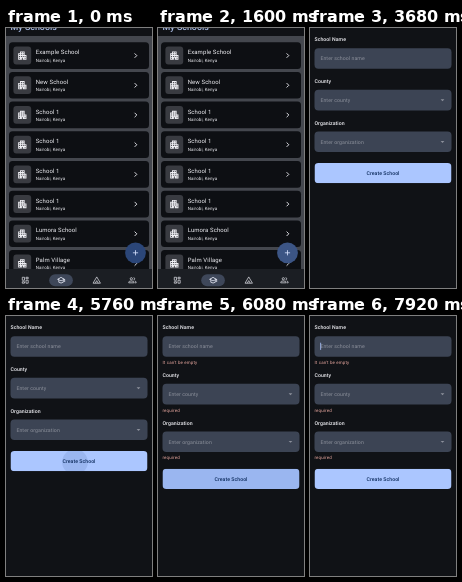
An HTML page that plays this animation: 146x260 px, repeating every 8 s.

```html
<!DOCTYPE html>
<html lang="en">
<head>
<meta charset="utf-8">
<title>School list and form</title>
<style>
  html, body { margin: 0; height: 100%; overflow: hidden; background: #101216; }
  svg { display: block; width: 100vw; height: 100vh; }
  text { font-family: Roboto, "Open Sans", sans-serif; text-rendering: geometricPrecision; fill: #f0f0f5; }
  .head { font-size: 8.9px; font-weight: 500; fill: #adc0ea; }
  .title { font-size: 5.94px; letter-spacing: .12px; }
  .sub { font-size: 4.45px; letter-spacing: .093px; }
  .label { font-size: 5.2px; font-weight: 500; letter-spacing: .037px; }
  .hint { font-size: 5.2px; letter-spacing: .08px; fill: #8c909b; }
  .error { font-size: 4.45px; letter-spacing: .148px; fill: #ecaaa2; }
  .action { font-size: 5.2px; font-weight: 500; letter-spacing: .037px; fill: #112f60; text-anchor: middle; }
</style>
</head>
<body>
<svg viewBox="0 0 146 260">
  <defs>
    <path id="building" d="M17 11V3H7v4H3v14h8v-4h2v4h8V11zM7 19H5v-2h2zm0-4H5v-2h2zm0-4H5V9h2zm4 4H9v-2h2zm0-4H9V9h2zm0-4H9V5h2zm4 8h-2v-2h2zm0-4h-2V9h2zm0-4h-2V5h2zm4 12h-2v-2h2zm0-4h-2v-2h2z"/>
    <clipPath id="buttonClip"><rect x="4.5" y="135" width="137" height="20.2" rx="4"/></clipPath>
  </defs>

  <g id="list">
    <rect width="146" height="260" fill="#44474e"/>
    <rect width="146" height="8" fill="#101216"/>
    <text class="head" x="4.6" y="1.5">My Schools</text>
    <g id="cards"></g>
    <circle cx="129.5" cy="224.8" r="10.4" fill="#2b4678"/>
    <circle id="press" cx="129.5" cy="224.8" r="10.4" fill="#d8e2ff"/>
    <path d="M126.9 224.8h5.2m-2.6-2.6v5.2" stroke="#d8e2ff" stroke-width=".8"/>
    <rect y="241" width="146" height="19" fill="#1b1e23"/>
    <rect x="43.2" y="246.3" width="23.7" height="11.9" rx="5.95" fill="#3e4759"/>
    <g fill="none" stroke="#dcdde4" stroke-width="2">
      <path transform="translate(14.8 247.8) scale(.37)" d="M4 4h6v8H4zM14 4h6v4h-6zM14 12h6v8h-6zM4 16h6v4H4z"/>
      <path transform="translate(86.3 247.8) scale(.37)" d="M12 3L2 20h20zM8 20l4-7 4 7"/>
      <path transform="translate(122 247.8) scale(.37)" d="M12 8a3 3 0 1 1-6 0a3 3 0 0 1 6 0M2 19v-2q0-3 7-3t7 3v2zM15 5a3 3 0 0 1 0 6M18 14q4 1 4 3v2h-4"/>
    </g>
    <path transform="translate(50.6 247.8) scale(.37)" fill="#eef1fc" d="M12 3L1 9l4 2.18v6L12 21l7-3.82v-6l2-1.09V17h2V9zm6.82 6L12 12.72 5.18 9 12 5.28zM17 15.99l-5 2.73-5-2.73v-3.72L12 15l5-2.73z"/>
  </g>

  <g id="form">
    <rect width="146" height="260" fill="#101216"/>
    <g id="fields"></g>
    <rect id="cursor" x="10.3" y="26.7" width=".8" height="7.2" fill="#adc6ff"/>
    <g id="button">
      <g clip-path="url(#buttonClip)">
        <rect x="4.5" y="135" width="137" height="20.2" fill="#abc6ff"/>
        <circle id="ripple" cx="69" cy="146" fill="#173a78"/>
      </g>
      <text class="action" x="73" y="147">Create School</text>
    </g>
  </g>
</svg>
<script>
const $ = id => document.getElementById(id);
const LOOP = 8000, PRESS = 1280, UNPRESS = 1900, FORM = 3680;
const TAP = 5760, ERRORS = 6080, RELEASE = 6480, CURSOR = 7920;
const ERROR_HEIGHT = 5.94;

const schools = ["Example School", "New School", "School 1", "School 1", "School 1", "School 1",
  "Lumora School", "Palm Village"];
$("cards").innerHTML = schools.map((name, i) => `
  <g transform="translate(0 ${14.2 + i * 29.7})">
    <rect x="3" width="140" height="26.7" rx="3.5" fill="#0d0f13"/>
    <rect x="7.4" y="4.4" width="17.8" height="17.8" rx="3" fill="#393b41"/>
    <use href="#building" transform="translate(10.8 7.8) scale(.46)" fill="#f0f0f5"/>
    <text class="title" x="29.7" y="12.1">${name}</text>
    <text class="sub" x="29.7" y="19.4">Nairobi, Kenya</text>
    <path d="M128.6 11.2l2.2 2.2-2.2 2.2" fill="none" stroke="#f0f0f5" stroke-width=".9"/>
  </g>`).join("");

const fields = [
  ["School Name", "Enter school name", "It can't be empty"],
  ["County", "Enter county", "required"],
  ["Organization", "Enter organization", "required"]
];
$("fields").innerHTML = fields.map(([label, hint, error], i) => `
  <g class="field">
    <text class="label" x="4.5" y="13.4">${label}</text>
    <rect x="4.5" y="20.2" width="137" height="20.6" rx="4" fill="#3c4454"/>
    <text class="hint" x="10.4" y="32.4">${hint}</text>
    ${i ? '<path d="M130.6 29.7h3.8l-1.9 1.9z" fill="#8c909b"/>' : ""}
    <text class="error" x="4.5" y="48.2">${error}</text>
  </g>`).join("");

const groups = [...document.querySelectorAll(".field")];
const errors = [...document.querySelectorAll(".error")];
const clamp = x => Math.max(0, Math.min(1, x));
const show = (el, on) => el.setAttribute("visibility", on ? "visible" : "hidden");
const moveY = (el, y) => el.setAttribute("transform", `translate(0 ${y})`);

function draw(t) {
  $("list").style.display = t < FORM ? "" : "none";
  $("form").style.display = t < FORM ? "none" : "";
  const pressed = clamp((t - PRESS) / 160) * (1 - clamp((t - UNPRESS) / 260));
  $("press").setAttribute("opacity", .1 * pressed);

  const gap = t >= ERRORS ? ERROR_HEIGHT : 0;
  groups.forEach((g, i) => moveY(g, i * (41.65 + gap)));
  moveY($("button"), gap * 3);
  errors.forEach(e => show(e, gap > 0));
  show($("cursor"), t >= CURSOR);

  const grow = clamp((t - TAP + 60) / 380);
  $("ripple").setAttribute("r", 80 * grow);
  $("ripple").setAttribute("opacity", t < TAP ? 0 : .11 * (1 - clamp((t - RELEASE) / 320)));
}

function tick(now) {
  draw(now % LOOP);
  requestAnimationFrame(tick);
}
draw(0);
requestAnimationFrame(tick);
</script>
</body>
</html>
```
